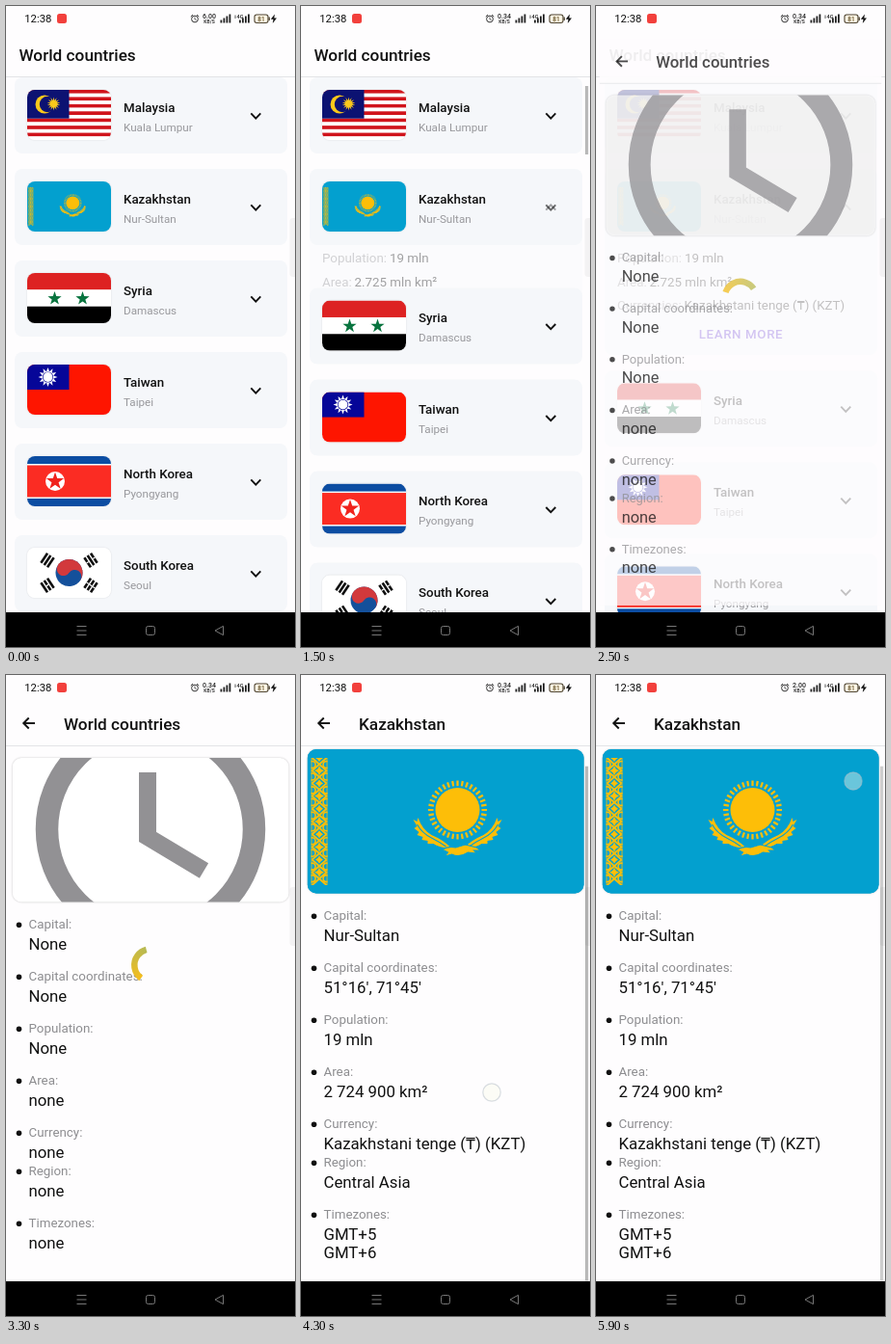
An HTML page with a canvas that plays this animation: 300 px wide and 665 px high, repeating every 6000 ms.

```html
<!DOCTYPE html>
<html lang="en">
<head>
<meta charset="utf-8">
<title>World countries</title>
<style>
html, body { margin: 0; width: 100%; height: 100%; overflow: hidden; background: #fff; }
canvas { display: block; width: 300px; height: 665px; }
</style>
</head>
<body>
<canvas></canvas>
<script>
const canvas = document.querySelector('canvas');
const c = canvas.getContext('2d');
const dpr = window.devicePixelRatio || 1;
canvas.width = 300 * dpr;
canvas.height = 665 * dpr;

const LOOP = 6000, STEP = 100;
const PAGE = '#fefdfe', GRAY = '#8d8d90', CARD = '#f5f7fa', GOLD = '#fdbe08', SKY = '#03a0cf';

// Piecewise linear value through [time, value] points.
function track(t, points) {
  if (t <= points[0][0]) return points[0][1];
  for (let i = 1; i < points.length; i++) {
    const [t0, v0] = points[i - 1], [t1, v1] = points[i];
    if (t < t1) return v0 + (v1 - v0) * (t - t0) / (t1 - t0);
  }
  return points[points.length - 1][1];
}
const between = (t, a, b) => t >= a && t < b;

function scoped(draw) { c.save(); draw(); c.restore(); }
function fade(alpha, draw) {
  if (alpha > 0) scoped(() => { c.globalAlpha *= alpha; draw(); });
}
function rect(x, y, w, h, color) { c.fillStyle = color; c.fillRect(x, y, w, h); }
function rounded(x, y, w, h, r, color) {
  c.beginPath();
  c.roundRect(x, y, w, h, r);
  if (color) { c.fillStyle = color; c.fill(); }
}
function disc(x, y, r, color) {
  c.beginPath();
  c.arc(x, y, r, 0, 7);
  c.fillStyle = color;
  c.fill();
}
function line(points, width, color, close) {
  c.beginPath();
  points.forEach(([x, y]) => c.lineTo(x, y));
  if (close) c.closePath();
  c.lineWidth = width;
  c.strokeStyle = color;
  c.stroke();
}
function text(s, x, middle, size, color = '#111', weight = 400, align = 'left') {
  c.font = `${weight} ${size}px Roboto, sans-serif`;
  c.textAlign = align;
  c.fillStyle = color;
  c.fillText(s, x, middle + size * 0.355);
}
function star(x, y, r, n, inner, color) {
  c.beginPath();
  for (let i = 0; i < 2 * n; i++) {
    const a = Math.PI * (i / n - 0.5), d = i % 2 ? r * inner : r;
    c.lineTo(x + d * Math.cos(a), y + d * Math.sin(a));
  }
  c.fillStyle = color;
  c.fill();
}

// Flags are drawn in an 87 x 52 box, except the large Kazakh one.
function malaysia() {
  for (let i = 0; i < 14; i++) rect(0, i * 52 / 14, 87, 3.8, i % 2 ? '#fff' : '#d0141c');
  rect(0, 0, 43.5, 29.7, '#0c1272');
  disc(18, 15, 9.5, '#fbc91b');
  disc(21, 15, 8.2, '#0c1272');
  star(27.5, 14.5, 7, 14, 0.5, '#fbc91b');
}

const WING = new Path2D('M-41 8Q-37 20-27 26Q-15 31-7 39Q-18 40-25 35L-31 35L-31 32L-37 31L-36 28L-42 26L-40 23L-45 19L-42 17L-46 10L-42 12Z');
const FEATHERS = new Path2D('M-42 15Q-37 24-27 29Q-19 33-12 38');
const BODY = new Path2D('M-16 41Q-9 37-2 39L8 36L20 39L24 42L17 42L20 45L11 44Q2 50-6 46L-13 48L-10 44Z');

function kazakhstan() {
  rect(0, 0, 288, 172, SKY);
  scoped(() => {
    c.beginPath();
    c.rect(4, 20, 17, 132);
    c.clip();
    for (let y = 20; y < 152; y += 26.4) {
      const m = y + 13.2;
      line([[5, y], [20, m], [5, y + 26.4]], 1.9, GOLD);
      line([[20, y], [5, m], [20, y + 26.4]], 1.9, GOLD);
      for (const side of [5, 20]) {
        c.beginPath();
        c.arc(side, y + 7, 3.5, 0, 7);
        c.moveTo(side + 3.5, y + 19.5);
        c.arc(side, y + 19.5, 3.5, 0, 7);
        c.lineWidth = 1.6;
        c.stroke();
      }
      star(12.5, m, 5, 4, 0.5, GOLD);
      star(12.5, y, 4, 4, 0.6, GOLD);
    }
  });
  line([[4.5, 20], [4.5, 152]], 0.8, GOLD);
  line([[20.5, 20], [20.5, 152]], 0.8, GOLD);
  scoped(() => {
    c.translate(156, 74);
    disc(0, 0, 23, GOLD);
    for (let i = 0; i < 36; i++) {
      const a = i * Math.PI / 18, x = Math.cos(a), y = Math.sin(a);
      line([[x * 25, y * 25], [x * 30.5, y * 30.5]], 2.2, GOLD);
    }
    c.fillStyle = GOLD;
    c.strokeStyle = SKY;
    c.lineWidth = 1.1;
    for (let side = 0; side < 2; side++) {
      c.fill(WING);
      c.stroke(FEATHERS);
      c.scale(-1, 1);
    }
    c.fill(BODY);
    c.stroke(BODY);
  });
}
function smallKazakhstan() { c.scale(87 / 287, 52 / 172); kazakhstan(); }

function syria() {
  rect(0, 0, 87, 17.4, '#dd2222');
  rect(0, 17.4, 87, 17.3, '#fff');
  rect(0, 34.7, 87, 17.4, '#000');
  star(28.5, 26.5, 7.5, 5, 0.4, '#09743f');
  star(57.5, 26.5, 7.5, 5, 0.4, '#09743f');
}
function taiwan() {
  rect(0, 0, 87, 52, '#fe1500');
  rect(0, 0, 43.5, 26, '#060698');
  star(21.5, 13, 10, 12, 0.6, '#fff');
  disc(21.5, 13, 5.6, '#060698');
  disc(21.5, 13, 4.9, '#fff');
}
function northKorea() {
  rect(0, 0, 87, 52, '#fff');
  rect(0, 0, 87, 8, '#0c4da2');
  rect(0, 44, 87, 8, '#0c4da2');
  rect(0, 9.5, 87, 33, '#fb2c23');
  disc(29, 26, 10, '#fff');
  star(29, 26, 9.6, 5, 0.39, '#f0221c');
}
function southKorea() {
  const red = '#d2393c', blue = '#14509b';
  rect(0, 0, 87, 52, '#fff');
  scoped(() => {
    c.translate(43.5, 26);
    c.rotate(0.59);
    disc(0, 0, 14, blue);
    c.beginPath();
    c.arc(0, 0, 14, Math.PI, 0);
    c.fillStyle = red;
    c.fill();
    disc(-7, 0, 7, red);
    disc(7, 0, 7, blue);
  });
  [[21, 13, -1, '111'], [66, 13, 1, '010'], [21, 39, 1, '101'], [66, 39, -1, '000']].forEach(([x, y, side, bars]) => scoped(() => {
    c.translate(x, y);
    c.rotate(side * 0.98);
    [...bars].forEach((solid, i) => {
      const top = i * 4 - 5.3;
      rect(-6, top, 12, 2.6, '#111');
      if (solid === '0') rect(-0.6, top, 1.2, 2.6, '#fff');
    });
  }));
}

const countries = [
  ['Malaysia', 'Kuala Lumpur', malaysia],
  ['Kazakhstan', 'Nur-Sultan', smallKazakhstan],
  ['Syria', 'Damascus', syria],
  ['Taiwan', 'Taipei', taiwan],
  ['North Korea', 'Pyongyang', northKorea],
  ['South Korea', 'Seoul', southKorea]
];
const facts = [
  [258, 'Capital:', 'None', 'Nur-Sultan'],
  [312, 'Capital coordinates:', 'None', "51°16', 71°45'"],
  [366, 'Population:', 'None', '19 mln'],
  [420, 'Area:', 'none', '2 724 900 km²'],
  [474, 'Currency:', 'none', 'Kazakhstani tenge (₸) (KZT)'],
  [514, 'Region:', 'none', 'Central Asia'],
  [568, 'Timezones:', 'none', 'GMT+5']
];

function chevron(y, up) {
  const d = up ? -2.6 : 2.6;
  line([[254.3, y - d], [259.3, y + d], [264.3, y - d]], 1.9, '#111');
}
function header(title, x) {
  rect(0, 26, 300, 47, PAGE);
  rect(0, 73, 300, 1, '#e3e4e6');
  text(title, x, 50.5, 17.2, '#111', 500);
}
function scrollbar(top, bottom, alpha) {
  fade(alpha, () => rect(295, top, 3.2, bottom - top, '#b9b9b9'));
}
function touch(x, y) {
  disc(x, y, 9.2, 'rgba(250,250,235,.42)');
  c.lineWidth = 1.2;
  c.strokeStyle = 'rgba(180,190,200,.5)';
  c.stroke();
}

function expanded(alpha) {
  fade(alpha, () => {
    rounded(9, 169, 283, 193, 8, CARD);
    text('Population:', 22, 261, 13.33, GRAY);
    text('19 mln', 92, 261, 13.33);
    text('Area:', 22, 286, 13.33, GRAY);
    text('2.725 mln km²', 55.5, 286, 13.33);
    text('Currencies:', 22, 310.5, 13.33, GRAY);
    text('Kazakhstani tenge (₸) (KZT)', 91.5, 310.5, 13.33);
    c.letterSpacing = '0.6px';
    text('LEARN MORE', 150.5, 340.5, 13.33, '#5421cf', 500, 'center');
    c.letterSpacing = '0px';
  });
}

function listScreen(t) {
  const open = (1 - Math.cos(Math.PI * track(t, [[1400, 0], [1700, 1]]))) / 2;
  const shown = open ** 0.7;
  rect(0, 26, 300, 603, PAGE);
  countries.forEach(([name, capital, flag], i) => {
    const y = 74 + 95 * i + (i > 1 ? 114.3 * open : 0);
    rounded(9, y, 283, 79, 8, CARD);
    if (i === 1) expanded(shown);
    scoped(() => {
      c.translate(22, y + 13);
      c.shadowColor = 'rgba(0,0,0,.18)';
      c.shadowBlur = 1.5 * dpr;
      rounded(0, 0, 87, 52, 8, '#fff');
      c.shadowColor = 'transparent';
      c.clip();
      flag();
    });
    text(name, 122, y + 31, 13.33, '#111', 500);
    text(capital, 122, y + 51.5, 11.67, '#98989c');
    const flipped = i === 1 ? shown : 0;
    fade(1 - flipped, () => chevron(y + 40, false));
    fade(flipped, () => chevron(y + 40, true));
  });
  header('World countries', 13.5);
  scrollbar(83, 154, track(t, [[1200, 0], [1400, 1], [2000, 1], [2300, 0]]));
  if (between(t, 1000, 1300)) touch(260, 209);
  if (between(t, 2100, 2300)) touch(151, 341);
}

function clock() {
  const ink = '#929194';
  c.beginPath();
  c.arc(150, 160, 107.5, 0, 7);
  c.lineWidth = 23.5;
  c.strokeStyle = ink;
  c.stroke();
  line([[147, 101], [147, 168], [205.5, 203]], 18, ink);
}
function spinner(t) {
  const start = 2.2 + (t - 3300) / 1000 * 2 * Math.PI;
  const paint = c.createConicGradient(start, 150, 301);
  paint.addColorStop(0, '#f5bd1c');
  paint.addColorStop(0.38, '#b3b957');
  c.beginPath();
  c.arc(150, 301, 16.7, start, start + 2.25);
  c.lineWidth = 6.5;
  c.strokeStyle = paint;
  c.stroke();
}

function detailScreen(t) {
  const loaded = t >= 3400, pictured = t >= 3500;
  const scroll = track(t, [[4200, 0], [4300, 9], [4500, 9], [4600, 0], [5100, 0], [5300, 9]]);
  rect(0, 26, 300, 603, PAGE);
  scoped(() => {
    c.translate(0, -scroll);
    scoped(() => {
      c.shadowColor = 'rgba(0,0,0,.25)';
      c.shadowBlur = 2 * dpr;
      rounded(6.8, 86, 286.7, 149.5, 9, pictured ? SKY : '#fff');
      c.shadowColor = 'transparent';
      c.clip();
      if (pictured) { c.translate(6.5, 75); kazakhstan(); } else clock();
    });
    facts.forEach(([y, label, empty, value]) => {
      disc(13.5, y + 1.3, 2.8, '#111');
      text(label, 23.5, y + 0.5, 13.33, GRAY);
      text(loaded ? value : empty, 23.5, y + 20.6, 16.8);
    });
    if (loaded) text('GMT+6', 23.5, 608.2, 16.8);
  });
  if (!loaded) spinner(t);

  // Overscroll glow
  fade(track(t, [[4600, 0], [5100, 0.14], [5300, 0]]), () => {
    c.beginPath();
    c.moveTo(0, 74);
    c.lineTo(0, 79);
    c.quadraticCurveTo(150, 135, 300, 79);
    c.lineTo(300, 74);
    c.fillStyle = '#d8e0e6';
    c.fill();
  });
  header(loaded ? 'Kazakhstan' : 'World countries', 60);
  line([[30, 50], [18.5, 50]], 1.9, '#111');
  line([[23.7, 44.5], [18.2, 50], [23.7, 55.5]], 1.9, '#111');
  scrollbar(74 + scroll * 2.3, 615 + scroll * 1.5,
    track(t, [[4100, 0], [4200, 1], [5700, 1], [5900, 0.7]]));

  if (between(t, 4200, 5400)) {
    touch(track(t, [[4300, 198], [5100, 190], [5400, 198]]),
      track(t, [[4200, 465], [4300, 433], [4500, 385], [5100, 477], [5400, 400]]));
  }
  if (t >= 5800) touch(267, 110);
}

function bars(x, y) {
  for (let i = 0; i < 4; i++) rect(x + i * 3, y - 3 - i * 2, 1.8, 3 + i * 2, '#222');
}
function systemBars(t) {
  rect(0, 0, 300, 26, PAGE);
  text('12:38', 19.2, 13.3, 11.3);
  rounded(53, 8, 10, 10, 2.5, '#f2403c');
  c.beginPath();
  c.arc(196, 13.5, 3.4, 0, 7);
  c.lineWidth = 1;
  c.strokeStyle = '#333';
  c.stroke();
  line([[196, 11.5], [196, 13.8], [197.5, 14.5]], 0.8, '#333');
  line([[191.8, 11], [194, 9]], 1, '#333');
  line([[198, 9], [200.2, 11]], 1, '#333');
  const speed = t < 1000 ? '6.00' : t < 4900 ? '0.34' : '2.00';
  text(speed, 211, 10.5, 7, '#222', 500, 'center');
  text('KB/S', 211, 16.3, 5, '#222', 500, 'center');
  bars(222.5, 17.5);
  text('4G', 243, 10.8, 5.5, '#222', 500, 'center');
  line([[238, 9.5], [238, 13]], 0.8, '#333');
  bars(242, 17.5);
  rounded(258, 9, 14, 8.5, 2.2, '#fff7e6');
  c.lineWidth = 1.1;
  c.strokeStyle = '#4d4330';
  c.stroke();
  rect(272.5, 11.5, 1.4, 3.5, '#4d4330');
  text('81', 265, 13.4, 6.5, '#5c4a20', 500, 'center');
  c.beginPath();
  [[279, 8.5], [274.8, 13.8], [277.5, 13.8], [276.8, 18], [281, 12.4], [278.3, 12.4]].forEach(p => c.lineTo(...p));
  c.fillStyle = '#111';
  c.fill();

  rounded(294.5, 220, 10, 61, 3, 'rgba(0,0,0,.045)');
  rect(0, 629, 300, 36, '#000');
  for (const y of [643.5, 648, 652.5]) line([[73.5, y], [83.5, y]], 1, '#777');
  rounded(145.5, 643.5, 9, 9, 2);
  c.stroke();
  line([[217, 648], [225.5, 643.3], [225.5, 652.7]], 1, '#777', true);
}

function draw(t) {
  c.setTransform(dpr, 0, 0, dpr, 0, 0);
  const enter = track(t, [[2200, 0], [2600, 1]]);
  if (enter < 1) listScreen(t);
  fade(enter, () => {
    const scale = 0.9 + 0.1 * enter;
    c.translate(150, 346);
    c.scale(scale, scale);
    c.translate(-150, -346);
    detailScreen(t);
  });
  systemBars(t);
}

function tick() {
  draw(Math.floor((performance.now() % LOOP) / STEP) * STEP);
  requestAnimationFrame(tick);
}
tick();
</script>
</body>
</html>
```
